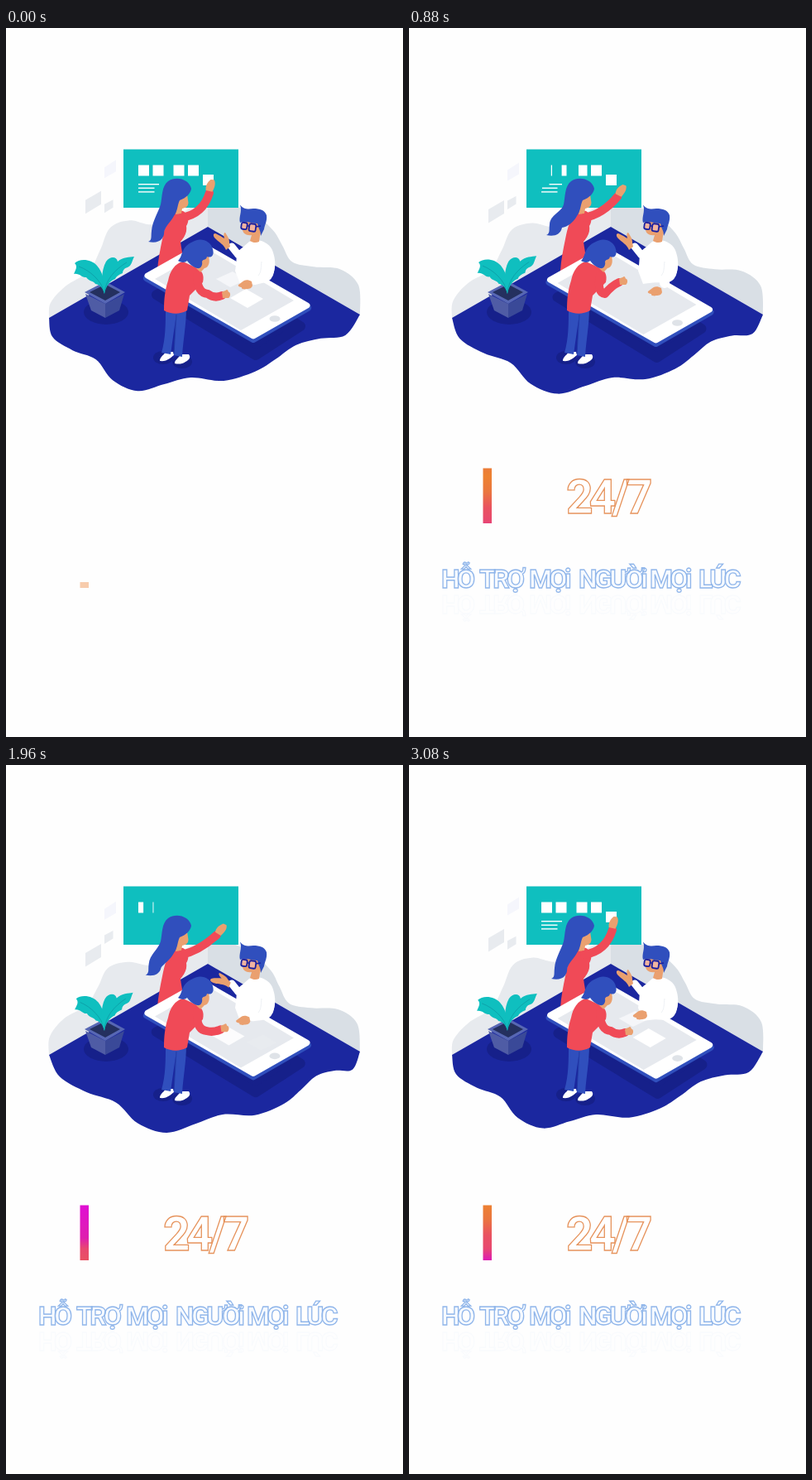
An HTML page that plays this animation: 480 by 856 pixels, repeating every 3.12 s.

```html
<!DOCTYPE html>
<html lang="vi">
<head>
<meta charset="utf-8">
<title>24/7</title>
<style>
  html, body { margin: 0; width: 100%; height: 100%; overflow: hidden; background: #fefefe; }
  svg { display: block; width: 100vw; height: 100vh; }
  .floor { fill: #1b279f; }
  .shade { fill: #16208a; }
  .blue { fill: #304fbd; }
  .red { fill: #f04a57; }
  .skin { fill: #eaa06f; }
  .white { fill: #fff; }
  .teal { fill: #0fbfbf; }
  .grey { fill: #e6e9ee; }
  .limb { fill: none; stroke-linecap: round; stroke-linejoin: round; }
  .redline { stroke: #f04a57; }
  .whiteline { stroke: #fff; }
  .vein { fill: none; stroke: #0c8f9c; stroke-width: .6; }
  .glasses { fill: #f0b3a0; stroke: #1a1fa0; stroke-width: 1.8; }
  .big { font: 700 57px Roboto, "Liberation Sans", sans-serif; letter-spacing: -5px; fill: #fff; stroke: #e6935c; stroke-width: 1.3; }
  .small { font: 700 32px Roboto, "Noto Sans", sans-serif; letter-spacing: -3.6px; fill: #f6faff; stroke: #8fb5ea; stroke-width: 1.3; }
</style>
</head>
<body>
<svg viewBox="0 0 480 856" preserveAspectRatio="none">
  <defs>
    <linearGradient id="tape" gradientUnits="userSpaceOnUse" x1="0" y1="0" x2="0" y2="105" spreadMethod="reflect">
      <stop offset="0" stop-color="#ed8231"/>
      <stop offset=".18" stop-color="#ea763f"/>
      <stop offset=".36" stop-color="#e95260"/>
      <stop offset=".52" stop-color="#e84870"/>
      <stop offset=".64" stop-color="#de1fae"/>
      <stop offset="1" stop-color="#e010d2"/>
    </linearGradient>
    <linearGradient id="edge" gradientUnits="userSpaceOnUse" x1="0" y1="0" x2="60" y2="0">
      <stop offset="0" stop-color="#fff"/><stop offset="1" stop-color="#000"/>
    </linearGradient>
    <mask id="wipe" maskUnits="userSpaceOnUse" x="0" y="600" width="480" height="150">
      <rect y="600" width="480" height="150" fill="url(#edge)"/>
    </mask>
    <clipPath id="slot"><rect x="190" y="520" width="140" height="80"/></clipPath>
    <clipPath id="rise"><rect x="80" y="500" width="30" height="176"/></clipPath>
  </defs>

  <path id="wallL" fill="#e7eaee"/>
  <path id="wallR" fill="#d9dfe5"/>
  <rect class="teal" x="142" y="146.5" width="139" height="70.5"/>
  <g id="notes" class="white"></g>
  <path id="floor" class="floor"/>
  <path id="tileA" fill="#f5f6fc" d="M119 168L133 159V173L119 181Z"/>
  <path id="tileB" fill="#e8ebef" d="M96 207L115 196V212L96 223.5Z"/>
  <path id="tileC" fill="#e8ebef" d="M119 213L129.5 207.5V217L119 223.5Z"/>

  <!-- plant -->
  <ellipse class="shade" cx="121" cy="343" rx="27" ry="15"/>
  <path fill="#4f5ca5" d="M96 321L120 333V350L103 341Z"/>
  <path fill="#3a4998" d="M120 333L143 321L137 341L120 350Z"/>
  <path fill="#5767b4" d="M95 319L120 306L144 319L120 333Z"/>
  <path fill="#24305f" d="M101 319L120 309.5L138 319L120 329Z"/>
  <g id="leafL">
    <path class="teal" d="M119 321C120 309 118 296 110 287C103 279 89 278 83 284C87 288 84 292 82 297C90 296 91 302 97 301C100 306 106 305 108 309C114 310 117 314 119 321Z"/>
    <path class="vein" d="M119 319C115 305 102 293 88 288"/>
  </g>
  <g id="leafR">
    <path class="teal" d="M119 321C115 308 115 293 121 282C126 275 134 276 135 282C142 276 149 277 155 276C152 282 152 287 147 289C143 290 141 293 141 296C136 298 133 300 132 303C126 305 121 311 119 321Z"/>
    <path class="vein" d="M119 319C121 304 131 292 146 283"/>
  </g>

  <!-- woman -->
  <path class="red" d="M207 220C197 226 193 236 190 250C187 265 184 278 183 293L212 292C216 279 212 268 211 258C217 251 219 246 218 239C222 233 221 225 214 221Z"/>
  <path class="skin" d="M209 201H219L220.5 211C220 217 216 217 213 218L212 224L205 225Z"/>
  <path id="armW" class="limb redline" stroke-width="10"/>
  <path id="handW" class="skin" d="M-4 7C-6 1-4-3-1-7L3-7.5C6-5 6 1 4 7Z"/>
  <path id="hair" class="blue"/>

  <!-- tablet -->
  <path id="shadow" class="shade" stroke="#16208a" stroke-width="12" stroke-linejoin="round" d="M182 322L244 290L356 360L302 395Z"/>
  <g id="tablet" stroke-linejoin="round">
    <path class="blue" stroke="#304fbd" stroke-width="8" d="M170 302L237 265L365 338L299 376Z"/>
    <path class="white" stroke="#fff" stroke-width="7" d="M171 299L237 262L364 335L299 372Z"/>
    <path class="grey" d="M180 303L244 267L348 329L284 365Z"/>
    <ellipse cx="325" cy="351" rx="6.5" ry="3.8" fill="#dfe3e8"/>
    <path id="cardA" class="white" d="M-20 0L-1-11L20 1L1 12Z"/>
    <path id="cardB" fill="#f5f6f9" d="M-18 0L2-9L18 1L-1 10Z"/>
  </g>

  <!-- man -->
  <path class="limb whiteline" stroke-width="9" d="M294 268L281 274L273 264"/>
  <path id="wave" class="skin" d="M-3 6C-6-1-11-3-15-7C-19-10-19-14-16-14C-11-12-8-10-5-8C-6-11-6-15-4-15C-1-10 1-8 1-3L2 2Z"/>
  <path class="white" d="M294 258C307 253 320 260 323 271C327 283 326 297 318 303C309 309 296 306 283 309L277 293C280 281 276 271 286 265Z"/>
  <path id="armM" class="limb whiteline" stroke-width="12"/>
  <path fill="none" stroke="#e9ecf1" stroke-width=".8" d="M309 282C308 290 309 294 305 299"/>
  <path id="handM" class="skin" d="M8-4C3-7-1-6-4-3L-8 0C-9 2-6 3-4 3C-5 5-1 6 2 5C6 5 8 4 9 1Z"/>
  <path class="skin" d="M285 231H303C310 233 310 243 307 251L306 258C302 260 298 259 295 257L297 250C291 251 286 248 286 243Z"/>
  <path class="blue" d="M283 213.5C287 219 293 219 299 218C307 218 313 220 315 226C316 233 313 237 312 243L308 251C308 244 305 242 304 236C296 236 291 232 283 235C281 228 286 222 283 213.5Z"/>
  <rect class="glasses" x="284.5" y="235" width="7" height="8" rx="2" transform="rotate(8 288 239)"/>
  <rect class="glasses" x="294" y="236.5" width="8" height="9" rx="2" transform="rotate(8 298 241)"/>
  <path stroke="#1a1fa0" stroke-width="1.5" d="M291 239H294M302 240L308 239"/>

  <!-- boy -->
  <ellipse class="shade" cx="190" cy="398" rx="12" ry="8"/>
  <ellipse class="shade" cx="213" cy="403" rx="12" ry="8"/>
  <path class="white" d="M186 402C186 397 190 396 193 391L202 391L203 395C199 398 195 403 186 402Z"/>
  <path class="white" d="M204 405C204 400 208 400 211 394L221 394C224 398 221 401 217 403C213 406 208 406 204 405Z"/>
  <path class="blue" d="M193 339L218 338C218 358 214 378 213 397L203 395L205 352L199 394L188 392C193 376 193 356 193 339Z"/>
  <path fill="none" stroke="#1f38a0" stroke-width=".8" d="M206 346L203 393"/>
  <path class="red" d="M214 282C204 284 198 294 196 305C192 317 191 328 191 341C200 346 210 346 219 341L222 323L238 307C240 298 237 292 229 289Z"/>
  <path class="skin" d="M233 276H245C247 283 245 289 240 290L235 295L229 289Z"/>
  <path class="blue" d="M226 258C235 252 248 257 250 267C252 274 249 278 243 276C242 281 239 278 237 282C238 287 235 291 231 290C225 288 222 285 219 281C216 284 211 283 208 281C214 276 211 264 226 258Z"/>
  <path id="armB" class="limb redline" stroke-width="10"/>
  <path id="handB" class="skin" d="M-5-3C-2-5 0-5 1-6C3-6 2-3 4-3C6-1 5 3 3 4L-4 4Z"/>

  <rect id="bar" x="89.5" width="10.5" height="66.5" fill="url(#tape)" clip-path="url(#rise)"/>
  <g clip-path="url(#slot)"><text id="big" class="big" x="190" y="586">24/7</text></g>
  <g mask="url(#wipe)">
    <text id="line" class="small" y="676"><tspan x="39">HỖ </tspan><tspan x="85">TRỢ </tspan><tspan x="145">MỌi </tspan><tspan x="205">NGƯỜi </tspan><tspan x="291">MỌi </tspan><tspan x="350">LÚC</tspan></text>
    <use href="#line" transform="matrix(1 0 0 -1 0 1361)" opacity=".045"/>
  </g>
</svg>
<script>
const LOOP = 3120, STEP = 40, PI = Math.PI;
const $ = id => document.getElementById(id);
const set = (id, name, value) => $(id).setAttribute(name, value);
const mix = (a, b, k) => a + (b - a) * k;
const ramp = (t, from, to) => Math.max(0, Math.min(1, (t - from) / (to - from)));
const ease = (t, from, to) => (1 - Math.cos(PI * ramp(t, from, to))) / 2;
// Eases up from a to b, holds, and eases back from c to d.
const pulse = (t, a, b, c, d) => ease(t, a, b) - ease(t, c, d);
const move = (id, x, y, turn = 0) => set(id, 'transform', `translate(${x} ${y}) rotate(${turn})`);

// Smooth curve with fixed ends whose inner points drift sideways by dx and rock by dy.
function curve(points, dx, dy, turns) {
  const end = points.length - 1;
  const p = points.map(([x, y], i) => [x + dx * Math.sin(PI * i / end), y + dy * Math.sin(turns * PI * i / end)]);
  let d = 'M' + p[0];
  for (let i = 0; i < end; i++) {
    const q = p[i], r = p[i + 1], before = p[i - 1] || q, after = p[i + 2] || r;
    const c1 = q.map((v, n) => v + (r[n] - before[n]) / 6);
    const c2 = r.map((v, n) => v - (after[n] - q[n]) / 6);
    d += `C${c1} ${c2} ${r}`;
  }
  return d;
}

const FLOOR = [[52, 350], [56, 373], [80, 389], [108, 400], [128, 425], [158, 438], [190, 430], [222, 422],
  [262, 426], [300, 415], [325, 400], [350, 383], [380, 375], [410, 371], [428, 346]];
const LEFT = [[52, 350], [54, 332], [72, 312], [100, 294], [114, 268], [126, 241], [150, 232], [185, 236], [244, 205]];
const RIGHT = [[244, 205], [295, 222], [322, 243], [334, 262], [346, 282], [372, 288], [404, 291], [426, 310], [428, 346]];

function drawScene(t) {
  const k = Math.abs(Math.sin(PI * (t - 100) / 3200)) ** 1.5;
  set('floor', 'd', curve(FLOOR, 42 * k, 8 * k, 2) + 'L244 240Z');
  set('wallL', 'd', curve(LEFT, -3 * k, -6 * k, 2) + 'V240Z');
  set('wallR', 'd', curve(RIGHT, -4 * k, 6 * k, 1) + 'L244 240Z');
  move('tileA', 0, 6 * k);
  move('tileB', 0, 21 * k);
  move('tileC', 0, -8 * k);
  set('leafL', 'transform', `rotate(${3 * k} 119 319)`);
  set('leafR', 'transform', `rotate(${-2 * k} 119 319)`);
}

// A note closes towards its right edge and later opens from its left edge.
function note(t, x, y, w, h, leave, back) {
  const gone = ramp(t, leave, leave + 210), come = ramp(t, back, back + 170);
  const left = come ? x : x + w * gone;
  return `<rect x="${left}" y="${y}" width="${w * (come || 1 - gone)}" height="${h}"/>`;
}

function drawNotes(t) {
  let out = note(t, 238, 177, 13, 13, 1275, 2240);
  for (let i = 0; i < 4; i++) out += note(t, 160 + 17.5 * i + (i > 1 ? 7.5 : 0), 165.5, 13, 13, 690 + 75 * i, 1880 + 68 * i);
  for (let i = 0; i < 3; i++) out += note(t, 160, 188 + 4.6 * i, i ? 19.5 : 25, 1.4, 800 + 70 * i, 2180 + 40 * i);
  $('notes').innerHTML = out;
}

function drawWoman(t) {
  const reach = pulse(t, 400, 1150, 2300, 2980);
  const x = mix(247, 260, reach), y = mix(190, 198, reach);
  move('handW', x, y, mix(12, 32, reach));
  set('armW', 'd', `M212 229Q${mix(238, 233, reach)} 225 ${x - mix(1, 5, reach)} ${y + mix(9, 7, reach)}`);

  const sway = pulse(t, 250, 880, 1500, 2500);
  const tx = 172 - 6 * sway, ty = 258 - 8 * sway;
  set('hair', 'd', `M224 194C222 183 206 178 196 185C188 191 189 204 187 213C184 223 ${tx + 5} ${ty - 25} ${tx + 4} ${ty - 13}`
    + `C${tx + 3} ${ty - 6} ${tx + 5} ${ty - 2} ${tx} ${ty}C${tx + 9} ${ty + 2} ${tx + 17} ${ty} ${tx + 19} ${ty - 9}`
    + 'C191 240 198 236 203 227C208 220 207 214 210 208C218 205 223 200 224 194Z');
}

function drawMan(t) {
  const out = ease(t, 0, 600), back = ease(t, 1400, 2400);
  const x = 289 + 8 * out - 18 * back, y = 310 + 8 * out - 16 * back;
  move('handM', x, y);
  set('armM', 'd', `M318 282Q321 301 309 302L${x + 12} ${y / 2 + 149}`);
  move('wave', 269, 262, -30 * pulse(t, 1000, 1800, 2350, 3000));
}

function drawBoy(t) {
  const lift = pulse(t, 0, 600, 1550, 2150);
  const x = 266 - 7 * lift, y = 322 - 16 * lift;
  move('handB', x, y);
  set('armB', 'd', `M231 298Q${231 - 4 * lift} 320 ${x - 22} 321Q${x - 14} ${y + 5} ${x - 5} ${y + 1}`);
}

function drawTablet(t) {
  const bob = 2.5 - 2.5 * Math.cos(2 * PI * t / 1800);
  move('tablet', -bob * .1, bob);
  move('shadow', -bob * .5, bob * .6);
  move('cardA', 291 - 40 * pulse(t, 700, 1200, 1500, 2500), 326);
  set('cardA', 'opacity', 1 - pulse(t, 300, 650, 1640, 2050));
  const lead = pulse(t, 0, 400, 700, 1200), far = pulse(t, 700, 1200, 1700, 2700);
  move('cardB', 272 - 10 * lead + 44 * far, 303 - 8 * lead + 37 * far);
  set('cardB', 'opacity', 1 - pulse(t, 200, 560, 1850, 2500));
}

function drawTitle(t) {
  set('bar', 'y', 531.5 + 137.5 * (1 - ramp(t, 0, 340)) ** 3);
  set('bar', 'opacity', .4 + .6 * ramp(t, 0, 160));
  set('tape', 'gradientTransform', `translate(0 ${462 + .09 * t})`);
  move('big', -150 * (1 - ramp(t, 0, 480)) ** 2, 0);
  set('edge', 'gradientTransform', `translate(${-60 + 1.125 * t} 0)`);
}

const parts = [drawScene, drawNotes, drawWoman, drawMan, drawBoy, drawTablet, drawTitle];
const start = performance.now();
function frame() {
  const t = Math.floor((performance.now() - start) % LOOP / STEP) * STEP;
  parts.forEach(draw => draw(t));
  requestAnimationFrame(frame);
}
frame();
</script>
</body>
</html>
```
